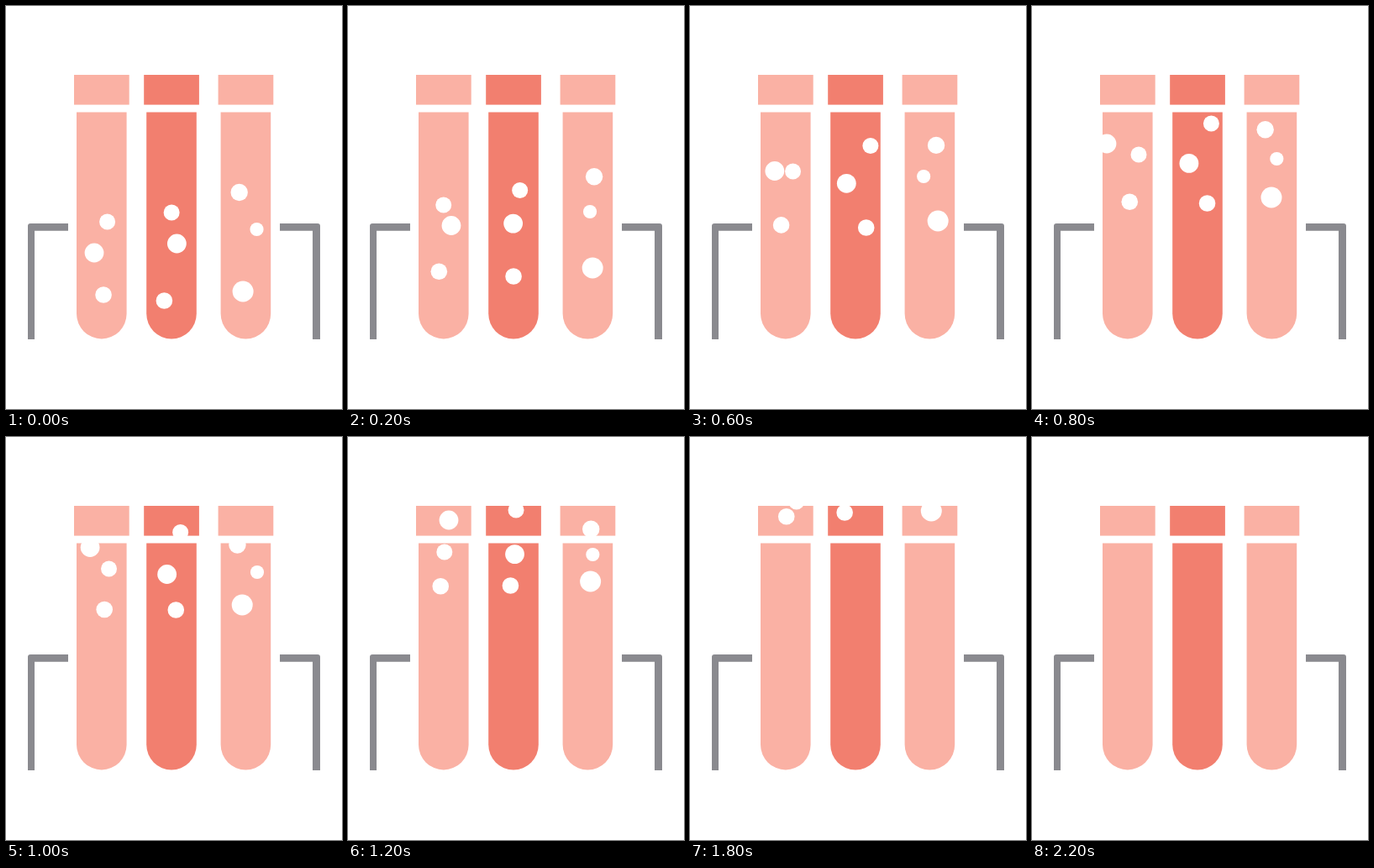
Animation of 400x480 px, one loop 2.6 s. Source, as an HTML page:

```html
<!DOCTYPE html>
<html lang="en">
<head>
<meta charset="utf-8">
<title>Bubbling test tubes</title>
<style>
  html, body { margin: 0; width: 100%; height: 100%; overflow: hidden; background: #fff; }
  svg { display: block; }
</style>
</head>
<body>
<svg width="400" height="480" viewBox="0 0 400 480">
  <g fill="#8a8a8f">
    <path d="M74 259H29q-3 0-3 3V397h8V267.8H74z"/>
    <path d="M326 259H371q3 0 3 3V397h-9V267.8H326z"/>
  </g>
  <g id="tubes"></g>
  <g id="bubbles" fill="#fff"></g>
</svg>
<script>
const LOOP = 2600, STEP = 200, LAST = 11;
const PALE = '#fab1a4', DEEP = '#f27f6f';

// Each bubble climbs `rise` px per step and sways around x, furthest right at step `peak`.
const tubes = [
  { left: 81, fill: PALE, rate: 1.2, bubbles: [
    { r: 9.5, x: 120, y: 257, rise: 20, sway: 7, peak: 4 },
    { r: 11.4, x: 107, y: 294, rise: 32.5, sway: 18, peak: 1.4 },
    { r: 9.8, x: 111, y: 344, rise: 27.7, sway: 7, peak: 4.6 }
  ] },
  { left: 164.2, fill: DEEP, rate: 0.65, bubbles: [
    { r: 9.5, x: 203, y: 246, rise: 26.5, sway: 12, peak: 3.2 },
    { r: 11.4, x: 197, y: 283, rise: 23.9, sway: 11, peak: 8.2 },
    { r: 9.8, x: 196, y: 351, rise: 29, sway: 14, peak: 3.3 }
  ] },
  { left: 252.6, fill: PALE, rate: 1.2, bubbles: [
    { r: 10.2, x: 288, y: 222, rise: 18.7, sway: 14, peak: 2 },
    { r: 8.1, x: 287, y: 266, rise: 21, sway: 12, peak: 5 },
    { r: 12.5, x: 290, y: 340, rise: 28, sway: 9, peak: 2.2 }
  ] }
];

const add = (parent, tag, attrs) => {
  const el = document.createElementNS('http://www.w3.org/2000/svg', tag);
  for (const k in attrs) el.setAttribute(k, attrs[k]);
  return document.getElementById(parent).appendChild(el);
};

for (const { left, fill, bubbles } of tubes) {
  add('tubes', 'rect', { x: left, y: 82, width: 65.7, height: 35.6, fill });
  add('tubes', 'path', { d: `M${left + 3} 126.4h59.6v240.2a29.8 29.8 0 0 1-59.6 0z`, fill });
  for (const b of bubbles) b.el = add('bubbles', 'circle', { r: b.r });
}

const start = performance.now();
function draw(now) {
  const t = Math.max(0, now - start) % LOOP;
  const step = Math.min(LAST, Math.floor(t / STEP));
  for (const { rate, bubbles } of tubes) {
    for (const { el, x, y, rise, sway, peak } of bubbles) {
      el.setAttribute('cx', x + sway * Math.cos(rate * (step - peak)));
      el.setAttribute('cy', y - rise * step);
    }
  }
  requestAnimationFrame(draw);
}
draw(start);
</script>
</body>
</html>
```
